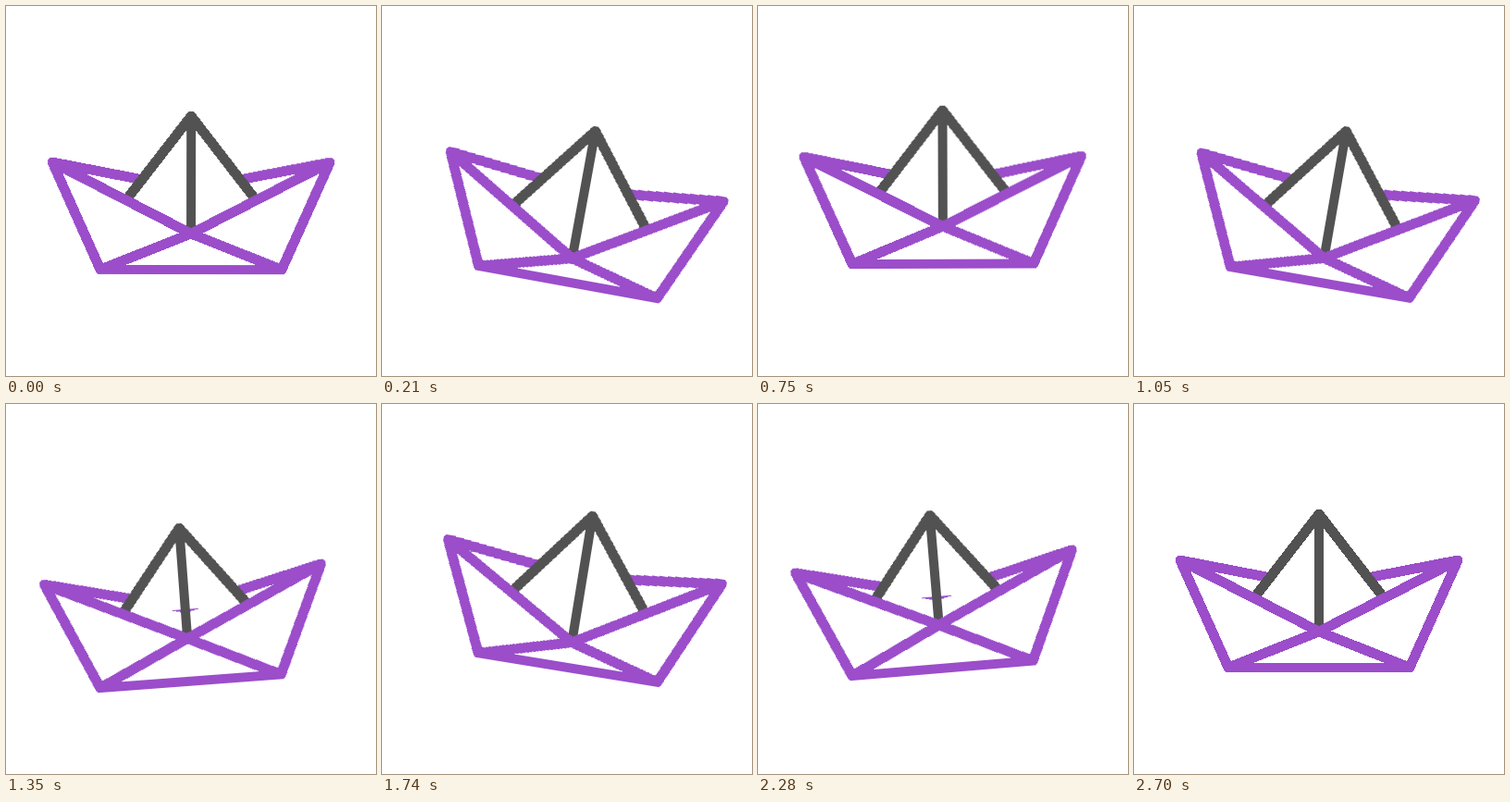
Write an HTML page that moves like this. It is 400x400 px and loops after 2.73 s.

```html
<!DOCTYPE html>
<html lang="en">
<head>
<meta charset="utf-8">
<title>Paper boat</title>
<style>
  html, body { margin: 0; width: 100%; height: 100%; overflow: hidden; background: #fff; }
  svg { display: block; width: 100vw; height: 100vh; }
  path { fill: none; stroke-width: 10.8; stroke-linejoin: round; shape-rendering: crispEdges; }
  .hull { stroke: #9b4dca; }
  .sail { stroke: #525252; fill: #fff; }
  #tilt { transform-origin: 200px 290px; }
</style>
</head>
<body>
<svg viewBox="0 0 400 400">
  <g id="bob">
    <g id="tilt">
      <path id="back" class="hull"/>
      <path id="sail" class="sail"/>
      <path id="front" class="hull"/>
      <path class="hull" d="M102 285H298"/>
    </g>
  </g>
</svg>
<script>
  const LOOP = 2730, END = 2700, HALF = 405, LEAD = 10;
  const ease = 'cubic-bezier(.37, 0, .63, 1)';
  const start = document.timeline.currentTime;

  // Swings between high and low from the first peak on, then settles at rest.
  function swing(id, first, high, low, pose) {
    const steps = [[0, 0]];
    for (let i = 0; i < 6; i++) steps.push([first + i * HALF, i % 2 ? low : high]);
    steps.push([END, 0], [LOOP, 0]);
    const frames = steps.map(([time, value]) => ({
      offset: time / LOOP, easing: ease, ...pose(value)
    }));
    const anim = document.getElementById(id).animate(frames, {
      duration: LOOP, delay: -LEAD, iterations: Infinity
    });
    anim.startTime = start;
  }

  // The fold opens with the tilt: the front knot sinks as the back one rises.
  function fold(id, shape) {
    const pose = s => ({ d: `path("${shape(s)}")` });
    document.getElementById(id).setAttribute('d', shape(0));
    swing(id, HALF / 2, 13, -8.3, pose);
  }

  swing('bob', HALF, 23.5, -7.3, v => ({ transform: `translate(0px, ${v}px)` }));
  swing('tilt', HALF / 2, 10.4, -5, v => ({ transform: `rotate(${v}deg)` }));

  fold('back', s => `M 50 169 L 200 ${198 - s} L 350 169`);
  fold('front', s => {
    const knot = `200 ${246 + s}`;
    return `M 50 169 L ${knot} L 298 285 L 350 169 L ${knot} L 102 285 Z`;
  });
  fold('sail', s => {
    const dx = 70.2 + 0.29 * s, y = 209.8 + 0.375 * s;
    return `M ${200 - dx} ${y} L 200 119 L ${200 + dx} ${y} M 200 119 L 200 ${246 + s}`;
  });
</script>
</body>
</html>
```
